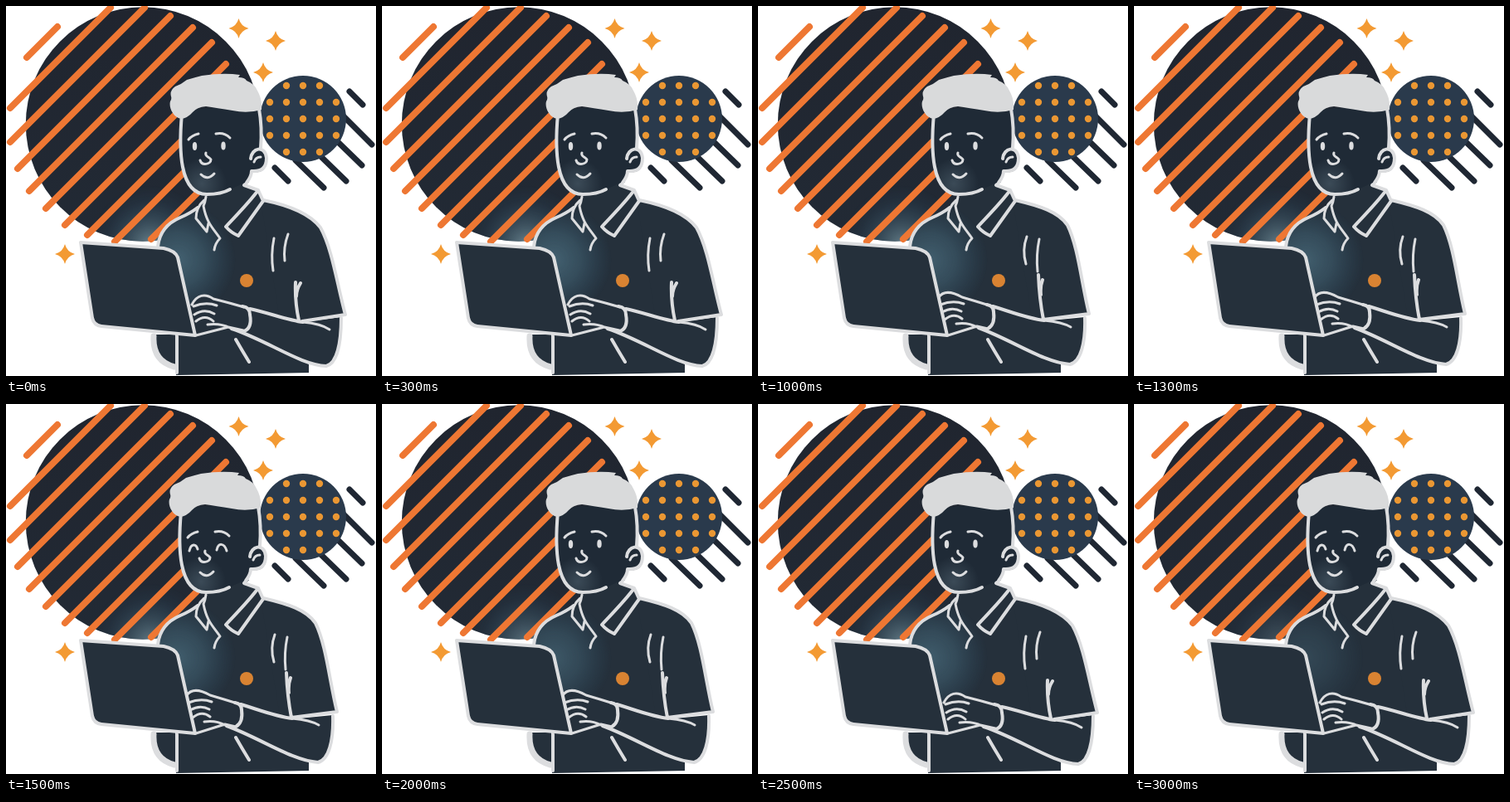
Recreate the animation shown at these times as an HTML page. Size 446 px wide and 446 px high, loop 3500 ms.

```html
<!DOCTYPE html>
<html lang="en">
<head>
<meta charset="utf-8">
<title>Working at a laptop</title>
<style>
  html, body { margin: 0; width: 100%; height: 100%; overflow: hidden; background: #fff; }
  svg { display: block; width: 100vw; height: 100vh; }
  .ink { fill: #25303b; }
  .line { fill: none; stroke: #dcdddf; stroke-width: 4; stroke-linecap: round; stroke-linejoin: round; }
  .fine { stroke-width: 3; }
  .bold { stroke-width: 5; }
  .bars { fill: none; stroke-linecap: round; }

  .near, .far, .open, .shut, .glow, .head { animation: 3.5s step-end infinite; }
  .near { animation-name: near; }
  .far { animation-name: far; }
  .open { animation-name: open; }
  .shut { animation-name: shut; }
  .glow { animation-name: glow; }
  .head { animation-name: nod; }
  @keyframes near { 0%, 71.4286% { opacity: 1 } 28.5714% { opacity: 0 } }
  @keyframes far { 0%, 71.4286% { opacity: 0 } 28.5714% { opacity: 1 } }
  @keyframes open { 0%, 57.1429% { opacity: 1 } 42.8571%, 85.7143% { opacity: 0 } }
  @keyframes shut { 0%, 57.1429% { opacity: 0 } 42.8571%, 85.7143% { opacity: 1 } }
  @keyframes nod { 0%, 57.1429% { transform: none } 42.8571%, 85.7143% { transform: translateX(-1px) } }
  @keyframes glow {
    0% { opacity: .85 } 14.2857% { opacity: 1 } 28.5714% { opacity: .8 } 42.8571% { opacity: .78 }
    57.1429% { opacity: .7 } 71.4286% { opacity: .78 } 85.7143% { opacity: .42 }
  }
</style>
</head>
<body>
<svg viewBox="0 0 446 446">
  <defs>
    <radialGradient id="haze">
      <stop offset="0" stop-color="#85a5b0" stop-opacity=".85"/>
      <stop offset=".4" stop-color="#56798a" stop-opacity=".5"/>
      <stop offset=".75" stop-color="#37607a" stop-opacity=".16"/>
      <stop offset="1" stop-color="#37607a" stop-opacity="0"/>
    </radialGradient>
    <radialGradient id="light">
      <stop offset="0" stop-color="#52798b" stop-opacity=".8"/>
      <stop offset=".45" stop-color="#4a7083" stop-opacity=".55"/>
      <stop offset="1" stop-color="#37607a" stop-opacity="0"/>
    </radialGradient>
    <radialGradient id="chin">
      <stop offset="0" stop-color="#7d97a5" stop-opacity=".3"/>
      <stop offset="1" stop-color="#7d97a5" stop-opacity="0"/>
    </radialGradient>
    <linearGradient id="disc" x1="0" y1="0" x2="0" y2="1">
      <stop offset="0" stop-color="#20252f"/>
      <stop offset="1" stop-color="#222a35"/>
    </linearGradient>
    <path id="star" d="M0-12Q2.5-2.5 12 0Q2.5 2.5 0 12Q-2.5 2.5-12 0Q-2.5-2.5 0-12Z"/>
    <path id="torso" d="M183 290C185 271 196 261 210 255Q223 250 232 241L241 230V212H293L289 216L305 222L310 234L340 243V380L365 432V442L205 445V396Z"/>
    <path id="face" d="M212 126C210 150 209 172 213 194C217 214 226 227 242 227C254 227 263 225 270 221L290 212L296 199L307 172V118Z"/>
    <clipPath id="discClip"><circle cx="165" cy="142.500" r="141.200"/></clipPath>
    <clipPath id="torsoClip"><use href="#torso"/></clipPath>
    <clipPath id="faceClip"><use href="#face"/></clipPath>
  </defs>

  <circle cx="165" cy="142.500" r="141.200" fill="url(#disc)"/>
  <g clip-path="url(#discClip)"><circle class="glow" cx="174" cy="288" r="72" fill="url(#haze)"/></g>
  <path id="stripes" class="bars" stroke="#ee7733" stroke-width="8"/>

  <path class="bars" stroke="#1f2733" stroke-width="7" d="M324 195L340 211M349 186L383 219M376 178L410 211M394 158L429 192M406 132L441 167M414 103L430 119"/>
  <circle cx="358" cy="136" r="52" fill="#2a3a4c"/>
  <path id="dots" class="bars" stroke="#ea9733" stroke-width="8.4"/>
  <g fill="#f39a33">
    <use href="#star" x="280.500" y="27"/>
    <use href="#star" x="325" y="42"/>
    <use href="#star" x="310" y="80"/>
    <use href="#star" x="71" y="299"/>
  </g>

  <path class="ink" d="M180 396C178 416 184 430 204 435V396Z"/>
  <use href="#torso" class="ink"/>
  <g clip-path="url(#torsoClip)"><circle class="glow" cx="207" cy="306" r="70" fill="url(#light)"/></g>
  <path class="line" stroke-width="7" style="stroke-width:7" d="M178 398C177 416 184 430 203 435"/>
  <path class="line" d="M206 398V442M183 290C185 271 196 261 210 255Q222 250 231 243M277 402Q285 416 293 429"/>

  <g class="near">
    <path class="ink" d="M307 234C340 240 366 250 379 267C393 292 399 335 409 372L357 380L330 378Z"/>
    <path class="ink" d="M290 364C315 371 340 381 358 381L404 375C404 406 399 433 386 434C355 433 315 403 272 389Z"/>
    <path class="ink" d="M222 362Q232 345 248 352L290 364L284 391L228 398Z"/>
    <path class="line" d="M310 234C340 240 366 250 379 267C393 292 399 335 409 372L357 380M349 333Q348 356 353 379M355 334Q350 342 350 350M404 376C404 406 399 431 386 434C355 433 315 403 272 389M294 365C317 370 341 379 358 381"/>
    <path class="line fine" d="M323 280Q319 300 322 319M340 275Q334 291 336 307M358 381Q380 383 390 390"/>
    <path class="line" d="M285 362Q294 363 294 372Q297 388 287 392"/>
    <path class="line fine" d="M224 360C230 348 240 346 250 353Q270 358 287 363M226 362Q241 356 254 361M227 372Q239 364 251 371M229 380Q240 371 250 380M243 384Q258 382 270 388M229 397L268 387L286 391"/>
  </g>

  <g class="far">
    <path class="ink" d="M307 234C340 241 362 248 373 264C386 290 390 335 399 371L346 378L330 376Z"/>
    <path class="ink" d="M280 362C306 370 326 378 343 380L394 375C395 406 389 429 376 432C345 430 305 402 266 388Z"/>
    <path class="ink" d="M216 352Q229 342 246 351L282 361L276 389L228 398Z"/>
    <path class="line" d="M310 234C340 241 362 248 373 264C386 290 390 335 399 371L344 378M338 324Q339 352 344 378M343 330Q340 338 341 348M394 376C395 406 389 429 376 432C345 430 305 402 266 388M283 362C306 369 326 377 345 379"/>
    <path class="line fine" d="M324 278Q318 294 323 311M339 281Q335 300 337 320M345 379Q367 381 377 387"/>
    <path class="line" d="M276 360Q284 361 284 369Q286 384 277 389"/>
    <path class="line fine" d="M218 351C225 341 237 346 246 351Q263 356 279 361M220 360Q235 354 248 359M222 369Q234 362 245 368M225 378Q236 369 246 377M239 383Q253 381 264 387M229 397L264 386L277 389"/>
  </g>

  <path class="line fine" d="M241 230Q240 237 238 241C242 262 249 267 258 280Q252 286 251 294"/>
  <path class="line fine" d="M239 234C232 240 229 249 229 256L242 272L244 262"/>
  <path class="line" d="M293 203Q292 210 287 216L304 222C293 237 277 253 265 266Q271 273 280 277L310 235L304 222"/>
  <circle cx="290" cy="331" r="8" fill="#d98332"/>

  <path class="ink line" style="fill:#25303b" d="M90 285L190 292Q204 295 207 303L228 397L115 386Q106 385 104 376Z"/>

  <g class="head">
    <use href="#face" fill="#1f2a36"/>
    <g clip-path="url(#faceClip)"><circle cx="236" cy="214" r="30" fill="url(#chin)"/></g>
    <path d="M296 186C297 171 313 168 315 184C315 196 309 202 297 200Z" fill="#1f2a36"/>
    <path class="line" d="M212 130C210 152 209 174 213 194C217 214 226 227 242 227C254 227 263 225 270 221M305 124Q309 146 307 171"/>
    <path class="line" d="M295 184C296 171 312 167 314 183C314 195 308 200 296 199Q296 205 290 213"/>
    <path class="line fine" d="M299 188Q301 182 307 182"/>
    <path d="M211 136C201 134 196 122 198 115Q200 112 199 109Q197 102 204 97Q212 94 218 89Q228 86 236 84Q262 80 282 83L280 86Q288 86 290 90Q300 94 303 102Q309 112 308 125Q291 130 273 126Q254 123 241 121Q230 122 225 128Q219 135 211 136Z" fill="#d9dadb"/>
    <path class="line fine" d="M220 161Q224 156 232 154M253 154Q263 152 270 159M241 177C239 181 245 182 247 185C247 191 236 193 234 186M235 203Q243 211 251 202"/>
    <g class="open" fill="#dcdddf">
      <ellipse cx="227.500" cy="169" rx="2.700" ry="5"/>
      <ellipse cx="262" cy="168.500" rx="2.700" ry="5"/>
    </g>
    <path class="line fine shut" d="M222 177C224 168 230 168 232 175M255 176C257 167 264 167 267 177"/>
  </g>
</svg>
<script>
  // Each stripe lies on a line x + y = sum.
  const stripes = [
    [25, 62, 87], [5, 126, 128], [5, 167, 169], [14, 198, 210], [28, 225, 251],
    [48, 248, 292], [71, 265, 335], [98, 230, 374], [131, 230, 415], [175, 245, 456],
  ].map(([from, to, sum]) => `M${from} ${sum - from}L${to} ${sum - to}`);
  document.getElementById('stripes').setAttribute('d', stripes.join(''));

  let dots = '';
  for (let row = -2; row <= 2; row++) {
    for (let col = -2; col <= 2; col++) {
      if (Math.abs(row * col) < 4) dots += `M${358 + 20 * col} ${136 + 20 * row}h0`;
    }
  }
  document.getElementById('dots').setAttribute('d', dots);
</script>
</body>
</html>
```
